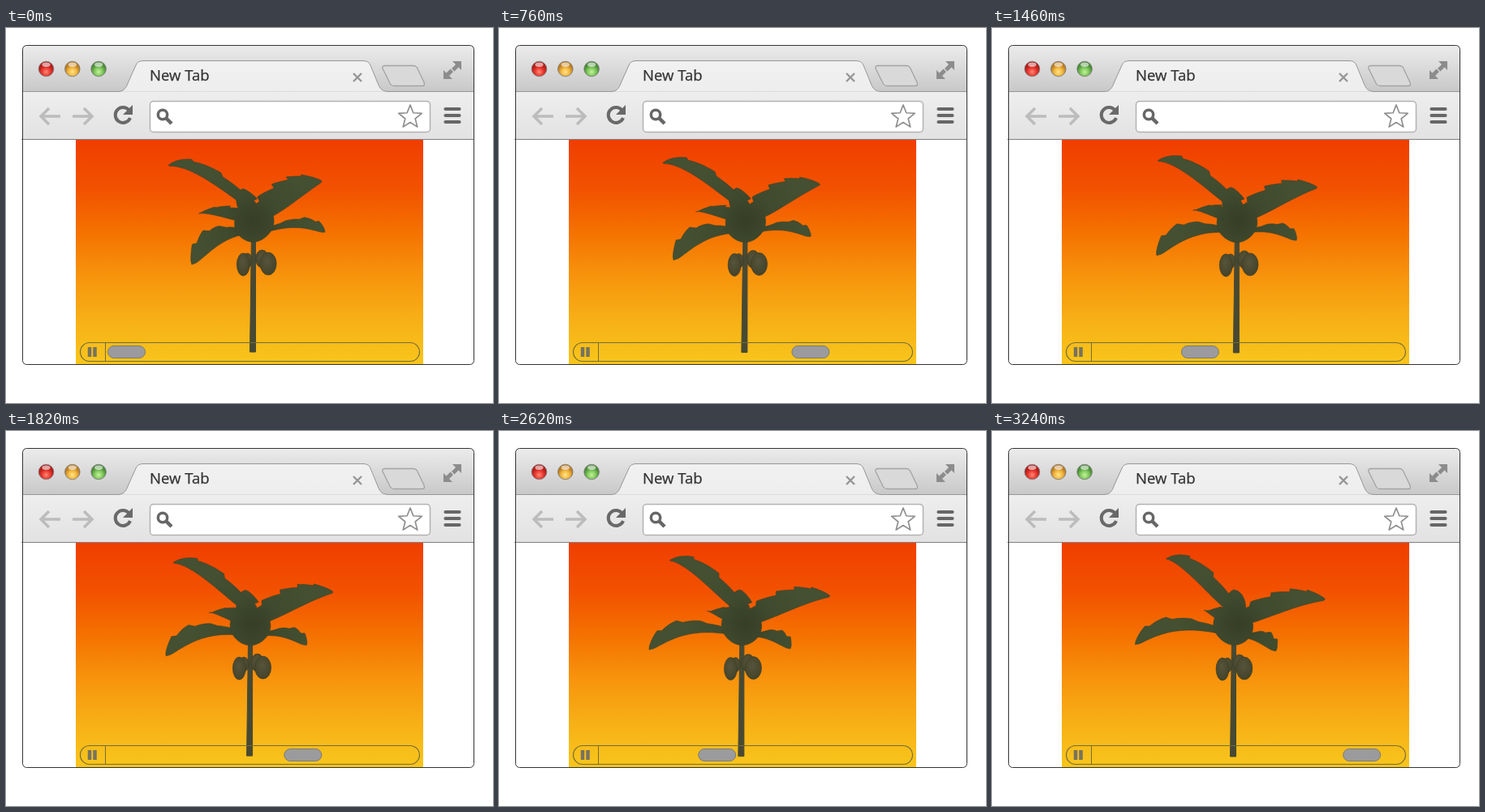
An HTML page for the animation above (3260 ms loop, 600 px wide and 463 px high).

```html
<!DOCTYPE html>
<html lang="en">
<head>
<meta charset="utf-8">
<title>Palm player</title>
<style>
  html, body { margin: 0; width: 100%; height: 100%; overflow: hidden; background: #fff; }
  svg { display: block; width: 600px; height: 463px; }
</style>
</head>
<body>
<svg viewBox="0 0 600 463" xmlns="http://www.w3.org/2000/svg">
  <defs>
    <linearGradient id="sky" x2="0" y2="1">
      <stop offset="0" stop-color="#f03e00"/>
      <stop offset=".22" stop-color="#f25200"/>
      <stop offset=".42" stop-color="#f57300"/>
      <stop offset=".6" stop-color="#f7930c"/>
      <stop offset=".8" stop-color="#f7b016"/>
      <stop offset="1" stop-color="#f8c61c"/>
    </linearGradient>
    <linearGradient id="title" x2="0" y2="1">
      <stop offset="0" stop-color="#ececec"/>
      <stop offset="1" stop-color="#c8c8c8"/>
    </linearGradient>
    <linearGradient id="bar" gradientUnits="userSpaceOnUse" x1="0" y1="40" x2="0" y2="138">
      <stop offset="0" stop-color="#f1f1f1"/>
      <stop offset=".45" stop-color="#ededed"/>
      <stop offset="1" stop-color="#e2e2e2"/>
    </linearGradient>
    <radialGradient id="leaf" gradientUnits="userSpaceOnUse" cx="304" cy="238" r="75">
      <stop offset="0" stop-color="#363e26"/>
      <stop offset=".45" stop-color="#404a2e"/>
      <stop offset="1" stop-color="#445031"/>
    </radialGradient>
    <radialGradient id="nut" cx=".45" cy=".4" r=".6">
      <stop offset="0" stop-color="#56543a"/>
      <stop offset="1" stop-color="#44442b"/>
    </radialGradient>
    <radialGradient id="red" cy=".7">
      <stop offset="0" stop-color="#ff8a75"/>
      <stop offset=".55" stop-color="#e83a31"/>
      <stop offset="1" stop-color="#b21c18"/>
    </radialGradient>
    <radialGradient id="amber" cy=".7">
      <stop offset="0" stop-color="#ffe58a"/>
      <stop offset=".55" stop-color="#f2b840"/>
      <stop offset="1" stop-color="#bd7d22"/>
    </radialGradient>
    <radialGradient id="green" cy=".7">
      <stop offset="0" stop-color="#c4f29c"/>
      <stop offset=".55" stop-color="#80c95c"/>
      <stop offset="1" stop-color="#4c8c39"/>
    </radialGradient>
    <clipPath id="frame"><rect x="20.5" y="21.5" width="556" height="394" rx="5"/></clipPath>
  </defs>

  <g clip-path="url(#frame)">
    <rect x="20" y="21" width="557" height="58" fill="url(#title)"/>
    <rect x="20" y="79" width="557" height="59" fill="url(#bar)"/>
    <path d="M20 78.500H138C146 78 148 74 151 66L160 46Q162 40.500 169 40.500H440Q447 40.500 449 46L458 68C461 76 464 78 471 78.500H577" fill="url(#bar)" stroke="#969696"/>
    <rect x="86" y="138" width="428" height="278" fill="url(#sky)"/>
  </g>
  <path d="M19 137.500H577" stroke="#808080"/>

  <g id="lights"></g>
  <text x="177" y="65" font-family="'Open Sans', 'Noto Sans', sans-serif" font-size="18.5" fill="#333" stroke="#333" stroke-width=".25">New Tab</text>
  <path d="M428 56L438 66M438 56L428 66" stroke="#969696" stroke-width="2.4"/>
  <path d="M467 46.500H502Q505 46.500 506.500 49L515 67Q516.500 71.500 513 71.500H478Q475 71.500 473.500 69L464 50Q463 46.500 467 46.500Z" fill="#d9d9d9" stroke="#a3a3a3" stroke-width="1.3"/>
  <g fill="#8c8c8c">
    <path d="M550 41H561V52L557.500 48.500L552.500 53.500L549 50L554 45Z"/>
    <path d="M550 63H539V52L542.500 55.500L547.500 50.500L551 54L546 59Z"/>
  </g>

  <g fill="none" stroke="#bcbcbc" stroke-width="3.500">
    <path d="M67 109H43M53 99L43 109L53 119"/>
    <path d="M82 109H106M96 99L106 109L96 119"/>
  </g>
  <path d="M152 102A9.500 9.500 0 1 0 153 111" fill="none" stroke="#696969" stroke-width="4"/>
  <path d="M156 95V107H144Z" fill="#696969"/>
  <rect x="177.500" y="90.500" width="345" height="38" rx="4" fill="#fff" stroke="#b2b2b2" stroke-width="1.5"/>
  <g fill="none" stroke="#666">
    <circle cx="193" cy="107" r="5.700" stroke-width="3.500"/>
    <path d="M197 111L204 118" stroke-width="4.500"/>
  </g>
  <path id="star" fill="#fff" stroke="#8f8f8f" stroke-width="1.7" stroke-linejoin="round"/>
  <path d="M541.500 100H558.500M541.500 108H558.500M541.500 116H558.500" stroke="#666" stroke-width="4.200" stroke-linecap="round"/>

  <g id="palm" stroke-linejoin="round"></g>

  <g stroke="#746c39" fill="none">
    <rect x="91.500" y="388.500" width="418" height="23" rx="11.500" stroke-width="1.2"/>
    <path d="M122.500 389V411"/>
    <path d="M103 394V406M109.500 394V406" stroke="#77735f" stroke-width="4.500"/>
  </g>
  <rect id="thumb" y="392.500" width="46" height="15" rx="7.500" fill="#9b9b9e" stroke="#7d7b74"/>
  <rect x="20.500" y="21.500" width="556" height="394" rx="5" fill="none" stroke="#333"/>
</svg>

<script>
const LOOP = 3260, STEP = 20;
const TURN = 25;              // degrees the palm turns in one loop
const TILT = .5;              // foreshortening of the leaf blades
const SEGMENTS = 30;
const palm = document.getElementById('palm');
const thumb = document.getElementById('thumb');
const radians = degrees => degrees * Math.PI / 180;

function add(parent, tag, attrs) {
  const node = document.createElementNS('http://www.w3.org/2000/svg', tag);
  return setAll(parent.appendChild(node), attrs);
}
function setAll(node, attrs) {
  for (const key in attrs) node.setAttribute(key, attrs[key]);
  return node;
}

// Window buttons and bookmark star
const lights = document.getElementById('lights');
['red', 'amber', 'green'].forEach((color, i) => {
  const cx = 49.5 + i * 32.3;
  add(lights, 'circle', { cx, cy: 50.5, r: 9.3, fill: `url(#${color})`, stroke: '#777', 'stroke-width': .8 });
  add(lights, 'ellipse', { cx, cy: 45.2, rx: 5, ry: 2.7, fill: '#fff', opacity: .6 });
});
const starPoints = Array.from({ length: 10 }, (_, i) => {
  const r = i % 2 ? 6.5 : 15, a = radians(i * 36 - 90);
  return [498 + r * Math.cos(a), 110 + r * Math.sin(a)];
});
document.getElementById('star').setAttribute('d', `M${starPoints.join('L')}Z`);

// Fronds circle the trunk: reach and depth are the orbit's radii,
// drop moves the tip down and lift arches the middle up
const fronds = [
  { angle: -115, reach: 32, depth: 28, base: 234, drop: -10, lift: 0, width: 18, teeth: 2 },
  { angle: 195.5, reach: 109, depth: 32, base: 222, drop: -44, lift: 20, width: 19, teeth: 3 },
  { angle: -48.4, reach: 122, depth: 56, base: 236, drop: -7, lift: 12, width: 30, teeth: 5 },
  { angle: 121.4, reach: 146, depth: 95, base: 252, drop: -41, lift: 25, width: 25, teeth: 4 },
  { angle: 37, reach: 110, depth: 70, base: 256, drop: -46, lift: 18, width: 21, teeth: 4 },
  { angle: 77, reach: 8, depth: 24, base: 222, drop: 19, lift: 0, width: 31, teeth: 0 },
  { angle: 226, reach: 95, depth: 30, base: 238, drop: 12, lift: 6, width: 20, teeth: 4 }
];
const nuts = [
  { angle: 165, orbit: 8, y: 287, rx: 6, ry: 9 },
  { angle: 155, orbit: 14, y: 292, rx: 8, ry: 14 },
  { angle: 30, orbit: 12, y: 285, rx: 8, ry: 11 },
  { angle: 25, orbit: 20, y: 291, rx: 10, ry: 14 }
];

function frondPoints(frond, turn, centerX) {
  const a = radians(frond.angle + turn), cos = Math.cos(a), sin = Math.sin(a);
  const upperSide = cos > 0 ? -1 : 1;
  const edge = (u, side) => {
    const along = u + .4 * u * (1 - u);
    const notch = side === upperSide ? .4 * (frond.teeth * u % 1) : 0;
    const half = side * frond.width * 1.5 * u ** .35 * (1 - u) ** .6 * (1 - notch);
    return [
      centerX + frond.reach * along * cos - half * sin,
      frond.base + frond.depth * along * sin + frond.drop * u
        - 4 * frond.lift * u * (1 - u) + half * TILT * cos
    ];
  };
  const steps = Array.from({ length: SEGMENTS + 1 }, (_, i) => i / SEGMENTS);
  return [...steps.map(u => edge(u, 1)), ...steps.reverse().map(u => edge(u, -1))].join(' ');
}

const trunk = add(palm, 'polygon', { fill: '#474933', stroke: '#474933' });
const nutNodes = nuts.map(({ rx, ry }) =>
  add(palm, 'ellipse', { rx, ry, fill: 'url(#nut)', stroke: '#3c3c28', 'stroke-width': .6 }));
const frondNodes = fronds.map(() =>
  add(palm, 'polygon', { fill: 'url(#leaf)', stroke: '#3a432b', 'stroke-width': .6 }));

function drawPalm(progress) {
  const turn = TURN * progress;
  const x = 305 - 7 * progress, foot = x - 1, bottom = 400 + 2 * progress;
  trunk.setAttribute('points',
    `${x - 2.5},255 ${x + 2.5},255 ${foot + 3.5},${bottom} ${foot - 3.5},${bottom}`);
  nuts.forEach(({ angle, orbit, y }, i) =>
    setAll(nutNodes[i], { cx: x + orbit * Math.cos(radians(angle + turn)), cy: y + 2 * progress }));
  fronds.forEach((frond, i) => frondNodes[i].setAttribute('points', frondPoints(frond, turn, x)));
}

// The thumb crosses the track, rests briefly and starts again
function thumbX(t) {
  const pass = Math.min(1, t % 1120 / 1080);
  return 125 + 331 * pass ** .97;
}

function render(now) {
  const t = Math.floor(now % LOOP / STEP) * STEP;
  drawPalm(t / (LOOP - STEP));
  thumb.setAttribute('x', thumbX(t) + .5);
}

let start;
function tick(now) {
  start ??= now;
  render(now - start);
  requestAnimationFrame(tick);
}
render(0);
requestAnimationFrame(tick);
</script>
</body>
</html>
```
